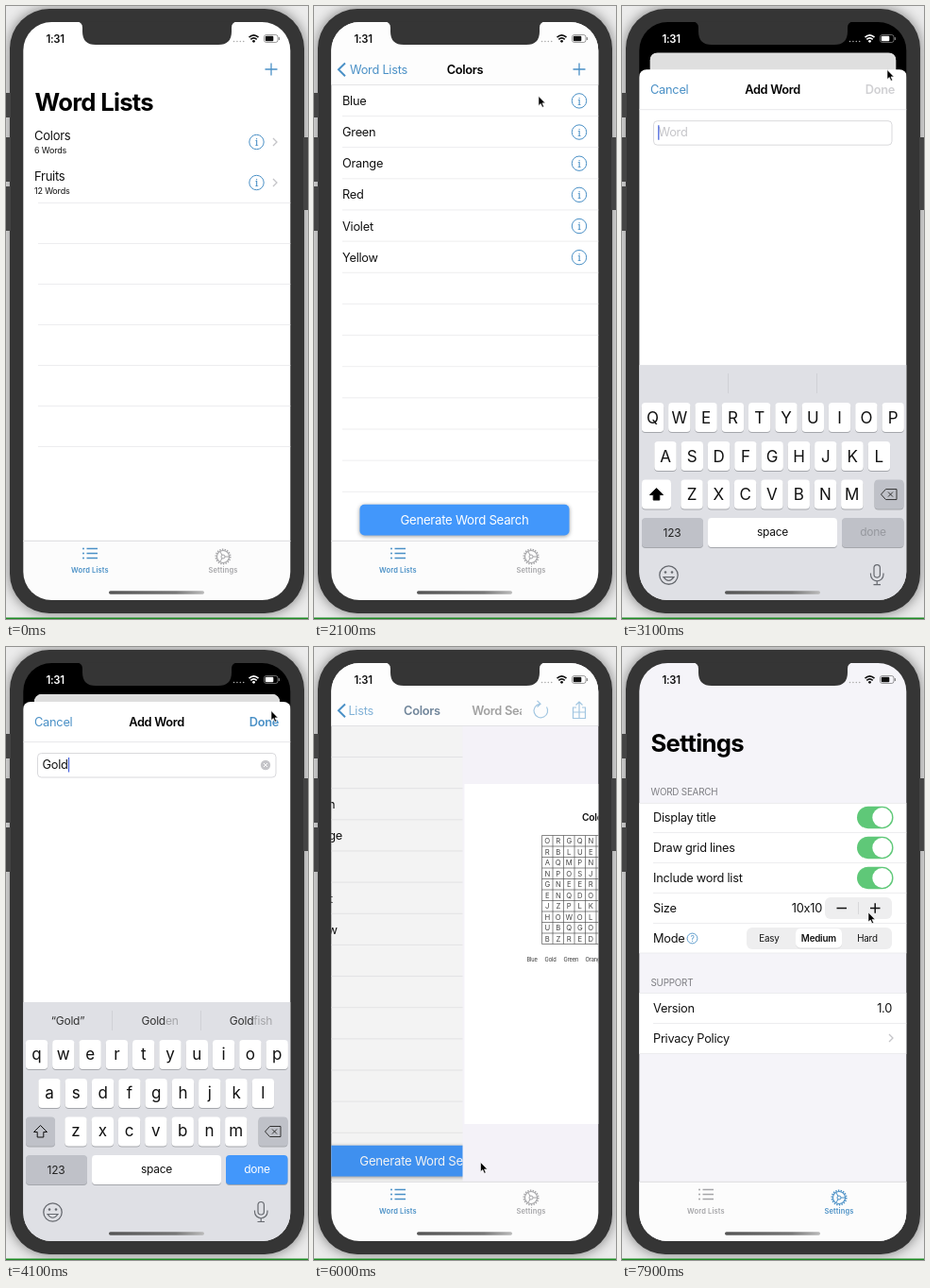
These frames come from a looping animation (320 by 649 pixels, 8 s). An HTML page:

```html
<!DOCTYPE html>
<html lang="en">
<head>
<meta charset="utf-8">
<title>Word search app</title>
<style>
html, body { margin: 0; width: 100%; height: 100%; overflow: hidden; background: #fff; }
svg { display: block; width: 320px; height: 649px; }
text { font-family: Inter, "Liberation Sans", sans-serif; letter-spacing: -.02em; white-space: pre; }
.semi { font-weight: 600; letter-spacing: -.025em; }
.large { font-weight: 700; letter-spacing: -.028em; }
.tab { font-weight: 600; letter-spacing: .02em; }
.cell { letter-spacing: 0; }
.serif { font-family: "Noto Serif", serif; }
.body { filter: drop-shadow(0 0 7px #777); }
.raised { filter: drop-shadow(0 1.5px 2px #0006); }
</style>
</head>
<body>
<svg viewBox="0 0 320 649">
  <defs>
    <clipPath id="screen"><rect x="18.3" y="17" width="283" height="612" rx="30"/></clipPath>
    <clipPath id="label"><rect x="36" y="50" width="184" height="33"/></clipPath>
    <linearGradient id="home"><stop stop-color="#555"/><stop offset=".7" stop-color="#777"/><stop offset="1" stop-color="#bbb"/></linearGradient>
  </defs>
  <rect width="320" height="649" fill="#ececec"/>
  <rect class="body" x="4" y="3" width="312" height="640" rx="42" fill="#353535"/>
  <path d="M0 92h5v26h-5zM0 139h5v47h-5zM0 191h5v47h-5zM315 139h5v77h-5z" fill="#444"/>
  <path d="M0 648.3H320" stroke="#1c8a22" stroke-width="1.4"/>
  <g clip-path="url(#screen)"><g id="stage"></g></g>
  <path d="M75 16.5Q81 17 81 23V27Q81 41 95 41H225Q239 41 239 27V23Q239 17 245 16.5Z" fill="#353535"/>
  <g id="pointer"><path d="M0 0V10L2.3 8 4 11.8 5.6 11 4 7.4H7.2Z" stroke="#fff" stroke-width=".6"/></g>
</svg>
<script>
const LOOP = 8000, BLUE = '#4a90c6', TINT = '#4297fb', GREY = '#c5c5c9', WIDTH = 283;
const stage = document.getElementById('stage'), pointer = document.getElementById('pointer');
const GRID = ['ORGQNTWVAY', 'RBLUEKFIXE', 'AQMPNHSOCL', 'NPOSJADLML', 'GNEERGBEKO',
              'ENQDOUITPW', 'JZPLKXCAFS', 'HOWOLMYRTI', 'UBQGODEVNH', 'BZREDKSJAQ'];

// drawing helpers
const rect = (x, y, w, h, fill, r = 0, more = '') =>
  `<rect x="${x}" y="${y}" width="${w}" height="${h}" rx="${r}" fill="${fill}" ${more}/>`;
const path = (d, color, w = 1, more = '') =>
  `<path d="${d}" fill="none" stroke="${color}" stroke-width="${w}" ${more}/>`;
const circle = (x, y, r, fill, more = '') => `<circle cx="${x}" cy="${y}" r="${r}" fill="${fill}" ${more}/>`;
const text = (x, y, s, size = 12.8, fill = '#111', cls = '', anchor = 'start') =>
  `<text x="${x}" y="${y}" font-size="${size}" fill="${fill}" class="${cls}" text-anchor="${anchor}">${s}</text>`;
const mid = (x, y, s, size, fill, cls) => text(x, y, s, size, fill, cls, 'middle');
const group = (content, more) => `<g ${more}>${content}</g>`;
const shift = (content, x, y = 0) => group(content, `transform="translate(${x} ${y})"`);
const fade = (content, a) => group(content, `opacity="${a}"`);
const rule = (y, x = 30, color = '#e9e9eb') => path(`M${x} ${y}H302`, color, .8);
const each = (n, f) => Array.from({ length: n }, (_, i) => f(i)).join('');

// motion helpers
const mix = (a, b, p) => a + (b - a) * p;
const clamp = v => Math.max(0, Math.min(1, v));
const spring = (t, start, rate = 13.5) => {
  const x = Math.max(0, t - start) / 1000 * rate;
  return 1 - (1 + x) * Math.exp(-x);
};

// icons
const info = (x, y) => circle(x, y, 7.7, 'none', `stroke="${BLUE}"`) + mid(x, y + 4.1, 'i', 11.5, BLUE, 'serif');
const chevron = (x, y) => path(`M${x - 2} ${y - 4}l4 4-4 4`, '#c4c4c8', 1.3);
const plus = path('M274.5 67H287.5M281 60.5V73.5', BLUE, 1.3);
const listIcon = color => each(3, i =>
  circle(82, 574.5 + i * 5, 1, color) + path(`M85.5 ${574.5 + i * 5}H97`, color, 1.3));
const gearIcon = color =>
  circle(230, 583, 7.7, 'none', `stroke="${color}" stroke-width="1.6" stroke-dasharray="1.4 1.29"`) +
  circle(230, 583, 6.5, 'none', `stroke="${color}" stroke-width="1.1"`) +
  circle(230, 583, 2, 'none', `stroke="${color}"`) +
  path('M232 583H236.5M229 581.3L226.7 577.4M229 584.7L226.7 588.6', color, 1);

function statusBar(color) {
  return text(42.5, 38.5, '1:31', 11.3, color, 'semi') +
    each(4, i => circle(241.5 + i * 3.4, 37.5, .8, '#aaa')) +
    path('M257.5 33.2Q262.5 28.6 267.5 33.2M259.3 35.3Q262.5 32.4 265.7 35.3', color, 1.6) +
    circle(262.5, 37.3, 1.4, color) +
    rect(273.5, 30.5, 14.5, 8, 'none', 2.3, `stroke="${color}" stroke-opacity=".5" stroke-width=".8"`) +
    rect(274.8, 31.8, 8.5, 5.4, color, 1) + rect(288.8, 33, 1.2, 3, color, .6, 'opacity=".5"');
}

function tabBar(active) {
  const color = i => i === active ? BLUE : '#a5a5a8';
  return rect(18, 566, 284, 64, '#fcfcfc') + rule(566.3, 18, '#d4d4d6') +
    listIcon(color(0)) + gearIcon(color(1)) +
    mid(89, 600.3, 'Word Lists', 7.5, color(0), 'tab') + mid(230, 600.3, 'Settings', 7.5, color(1), 'tab');
}

// screens
function listsPage(t) {
  const row = (y, name, count) => text(30, y - 2, name, 13) + text(30, y + 12, `${count} Words`, 9) +
    info(265.5, y) + chevron(285, y);
  return rect(18, 17, 284, 550, '#fff') +
    (t > 950 && t < 1700 ? rect(18, 123, 284, 43, '#dcdcde') : '') +
    text(30.5, 111, 'Word Lists', 25.7, '#000', 'large') +
    row(144, 'Colors', 6) + row(187, 'Fruits', 12) +
    each(7, i => rule(208.5 + i * 43, 34));
}

function colorsPage(t) {
  const words = ['Blue', 'Green', 'Orange', 'Red', 'Violet', 'Yellow'];
  if (t > 4400) words.splice(1, 0, 'Gold');
  return rect(18, 17, 284, 550, '#fff') +
    each(13, i => rule(116.5 + i * 33.15)) +
    words.map((w, i) => text(30, 105 + i * 33.15, w) + info(281, 100.4 + i * 33.15)).join('') +
    rect(48.5, 527.7, 222, 32.8, t > 5760 && t < 5880 ? '#79b5fc' : TINT, 5, 'class="raised"') +
    mid(159.5, 548.6, 'Generate Word Search', 13.2, '#fff');
}

function searchPage(t) {
  const lines = each(11, i => `M102 ${199.5 + i * 11.5}h115M${102 + i * 11.5} 199.5v115`);
  const letters = each(100, i => {
    const r = i / 10 | 0, c = i % 10;
    return mid(107.8 + c * 11.5, 208.3 + r * 11.5, t > 6650 ? GRID[c][r] : GRID[r][c], 7.7, '#444', 'cell');
  });
  const words = ['Blue', 'Gold', 'Green', 'Orange', 'Red', 'Violet', 'Yellow'];
  const places = [86, 105, 125, 148, 175, 191, 214];
  return rect(18, 17, 284, 550, '#f4f2f8') + rect(20, 145, 280, 360, '#fff') +
    mid(160, 183.5, 'Colors', 10.3, '#111', 'semi') + path(lines, '#555', .7) + letters +
    words.map((w, i) => text(places[i], 333, w, 5.7, '#333')).join('');
}

function navBar(p, q) {
  const backLabel = group(fade(text(mix(38, -33, q), 71.5, 'Word Lists', 12.8, BLUE), p * (1 - q * .6)), 'clip-path="url(#label)"');
  const colors = mid(mix(mix(250, 160, p), 70, q), 71.5, 'Colors', 12.8, q > .8 ? BLUE : q > .2 ? '#70859a' : '#000', q > .9 ? '' : 'semi');
  const title = mid(mix(252, 160, q), 71.5, 'Word Search', 12.8, '#000', 'semi');
  const tools =
    path('M246.5 63.5A7.3 7.3 0 1 1 239 60.3M236.5 56.8L240 60.3 236.5 63.5', BLUE, 1.2) +
    path('M278 64H274.5V75.5H287.5V64H284M281 75V58M277.5 61.5L281 58 284.5 61.5M274.5 69H287.5', BLUE, 1.2);
  return (p > .03 ? fade(rect(18, 17, 284, 66.5, '#fdfdfd') + rule(83.5, 18, '#dedee0'), p) : '') +
    fade(path('M33 60.5L26 67.3 33 74.2', BLUE, 2), p) +
    (q < .98 ? backLabel : '') + fade(colors, p) +
    group(fade(title, q ** 1.5), 'clip-path="url(#label)"') +
    fade(plus, 1 - clamp(q * 2)) + fade(tools, q);
}

function listTab(t) {
  const p = spring(t, 1080), q = spring(t, 5875);
  const push = (from, to, k) => {
    if (k < .001) return from;
    if (k > .998) return to;
    return shift(from, -k * WIDTH * .3) + rect(18, 17, 284, 550, '#000', 0, `opacity="${k * .09}"`) +
      shift(to, (1 - k) * WIDTH);
  };
  const content = t < 5000 ? push(listsPage(t), colorsPage(t), p) : push(colorsPage(t), searchPage(t), q);
  return content + navBar(p, q) + tabBar(0);
}

function settingsTab() {
  const toggle = y => rect(249, y - 11.7, 38.5, 23.4, '#5fc878', 11.7) + circle(275.7, y, 10.4, '#fff');
  const rows = ['Display title', 'Draw grid lines', 'Include word list', 'Size', 'Mode'];
  return rect(18, 17, 284, 612, '#f5f4f9') +
    text(30.5, 111, 'Settings', 25.7, '#000', 'large') +
    text(30.5, 157, 'WORD SEARCH', 9.8, '#7d7d82') + text(30.5, 359, 'SUPPORT', 9.8, '#7d7d82') +
    rect(18, 165.5, 284, 158.5, '#fff') + rect(18, 366.5, 284, 64, '#fff') +
    [165.5, 324, 366.5, 430.5].map(y => rule(y, 18)).join('') +
    [196.5, 228.5, 260.5, 292.5, 398.5].map(y => rule(y, 33)).join('') +
    rows.map((r, i) => text(33, 185.3 + i * 31.9, r)).join('') +
    [180.5, 212.5, 244.5].map(toggle).join('') +
    text(212, 281, '10x10', 12.8, '#111', '', 'end') +
    rect(215, 265, 71, 23, '#eeeeef', 6) + path('M250.5 270V283', '#d2d2d5', .8) +
    path('M227.5 276.5H238M263 276.5H273.5M268.2 271.2V281.8', '#111', 1.5) +
    circle(74.5, 308.5, 5.4, 'none', `stroke="${BLUE}" stroke-width=".9"`) + mid(74.6, 311.6, '?', 8.5, BLUE) +
    rect(132, 297, 154, 23, '#eeeeef', 6) +
    rect(184, 298.5, 49, 21, '#dcdcde', 5) + rect(184, 298, 49, 20.5, '#fff', 5) +
    mid(156, 312, 'Easy', 9.8) + mid(208.3, 312, 'Medium', 9.8, '#111', 'semi') + mid(260, 312, 'Hard', 9.8) +
    text(33, 387, 'Version') + text(286, 387, '1.0', 12.8, '#111', '', 'end') +
    text(33, 418.7, 'Privacy Policy') + chevron(285, 414) + tabBar(1);
}

// add-word sheet
const TYPED = [[3500, 'G', ['Go', 'Good']], [3680, 'Go', ['Good', 'Going']],
               [3860, 'Gol', ['Gold', 'Golf']], [4040, 'Gold', ['Golden', 'Goldfish']]];

function keyboard(t, entry) {
  const key = (x, y, w, fill = '#fff') => rect(x, y + 1, w, 31, '#a5a7ac', 4) + rect(x, y, w, 31, fill, 4);
  const dark = '#bfc1c8', word = entry ? entry[1] : '';
  const row = (letters, x, y) => [...letters].map((c, i) =>
    key(x + i * 28.3 - 11.7, y, 23.4) + mid(x + i * 28.3, y + (word ? 20.5 : 21.5), word ? c.toLowerCase() : c, 17, '#111', 'cell')).join('');
  let hints = '';
  if (entry) {
    const a = clamp((t - entry[0]) / 180);
    const hint = (x, s) => mid(x, 399.5, `${word}<tspan fill-opacity="${a}">${s.slice(word.length)}</tspan>`, 12, '#333');
    hints = mid(65.5, 399.5, `“${word}”`, 12, '#333') + hint(163, entry[2][0]) + hint(259.5, entry[2][1]);
  }
  return rect(18, 376, 284, 260, '#dfe0e5') + path('M112.5 385V406M206.5 385V406', '#cccdd2', .8) + hints +
    row('QWERTYUIOP', 32.5, 416) + row('ASDFGHJKL', 46, 457) + row('ZXCVBNM', 74, 497.5) +
    key(21, 497.5, 31, word ? dark : '#fff') + key(267.5, 497.5, 31, dark) +
    `<path d="M36.5 506.5l7 7h-3.7v5.5h-6.6v-5.5h-3.7z" fill="${word ? 'none' : '#000'}" stroke="#111"/>` +
    path('M274.5 513L279.5 507.5H291V518.5H279.5ZM282 510.5l5 5M287 510.5l-5 5', '#333') +
    key(21, 538, 65, dark) + mid(53, 558, '123', 12, '#222') +
    key(91, 538, 137) + mid(159.5, 557.3, 'space', 12) +
    key(233, 538, 65.5, word ? TINT : dark) + mid(266, 557.3, 'done', 12, word ? '#fff' : '#96989e') +
    circle(49.5, 598.5, 9.7, 'none', 'stroke="#66696f" stroke-width="1.3"') +
    circle(46, 595.5, 1.3, '#66696f') + circle(53, 595.5, 1.3, '#66696f') +
    path('M44 600.5Q49.5 608 55 600.5Z', '#66696f', 1.2) +
    rect(267, 587.5, 6.4, 13.5, 'none', 3.2, 'stroke="#66696f" stroke-width="1.2"') +
    path('M263.5 596.5V598A6.7 6.7 0 0 0 277 598V596.5M270.2 604.5V608.5M266.5 608.5H274', '#66696f', 1.2);
}

function sheet(t, k) {
  const entry = TYPED.filter(e => t >= e[0]).pop();
  const word = entry ? entry[1] : '';
  const caretX = [38.8, 49, 56.5, 59.5, 66.5][word.length];
  const form = rect(18, 58, 284, 700, '#fff', 8) +
    text(30, 83.7, 'Cancel', 12.8, BLUE) + mid(159.5, 83.7, 'Add Word', 12.8, '#000', 'semi') +
    text(289, 83.7, 'Done', 12.8, word ? BLUE : '#d0d0d3', 'semi', 'end') +
    rule(100.5, 18, '#e4e4e6') +
    rect(33.5, 112.5, 252.5, 25.5, '#fff', 4, 'stroke="#d5d5d8" stroke-width=".9"') +
    text(38.5, 129.3, word || 'Word', 12.8, word ? '#111' : GREY) +
    path(`M${caretX} 117V132.5`, '#4c67dd', 1.3) +
    (word ? circle(275, 125, 5.2, GREY) + path('M273 123l4 4M277 123l-4 4', '#fff') : '');
  return shift(form, 0, (1 - k) * 571) + shift(keyboard(t, entry), 0, (1 - k) * 253);
}

// the page behind the sheet shrinks into a dimmed, rounded card
function card(page, k) {
  const s = mix(1, .917, k);
  const dim = rect(18, 17, 284, 612, '#000', 0, `opacity="${k * .12}"`);
  return rect(18, 17, 284, 612, '#000') +
    group(page + dim, `transform="translate(${160 * (1 - s)} ${mix(17, 50, k) - 17 * s}) scale(${s})" style="clip-path:inset(0 round ${9 * k}px)"`);
}

// pointer stops: time, x, y
const STOPS = [[100, 214, 400], [700, 160, 146], [1880, 160, 146], [2250, 281, 67.5], [4800, 281, 67.5],
  [5450, 176.5, 545.5], [6250, 176.5, 545.5], [6600, 240, 68], [6750, 240, 68], [7150, 230, 585],
  [7400, 230, 585], [7850, 261, 281], [LOOP, 261, 281]];

function placePointer(t) {
  const i = STOPS.findIndex(s => s[0] > t);
  pointer.setAttribute('visibility', i > 0 ? 'visible' : 'hidden');
  if (i < 1) return;
  const [t0, x0, y0] = STOPS[i - 1], [t1, x1, y1] = STOPS[i];
  const u = (t - t0) / (t1 - t0), e = u * u * (3 - 2 * u);
  pointer.setAttribute('transform', `translate(${mix(x0, x1, e)} ${mix(y0, y1, e)})`);
}

function draw(now) {
  const t = now % LOOP;
  const k = spring(t, 2650) * (1 - spring(t, 4430, 30));
  const page = t < 7200 ? listTab(t) : settingsTab();
  stage.innerHTML = (k > .004 ? card(page, k) + sheet(t, k) : page) +
    statusBar(k > .4 ? '#fff' : '#111') + rect(109, 619.3, 101, 3.4, 'url(#home)', 1.7);
  placePointer(t);
  requestAnimationFrame(draw);
}
requestAnimationFrame(draw);
</script>
</body>
</html>
```
